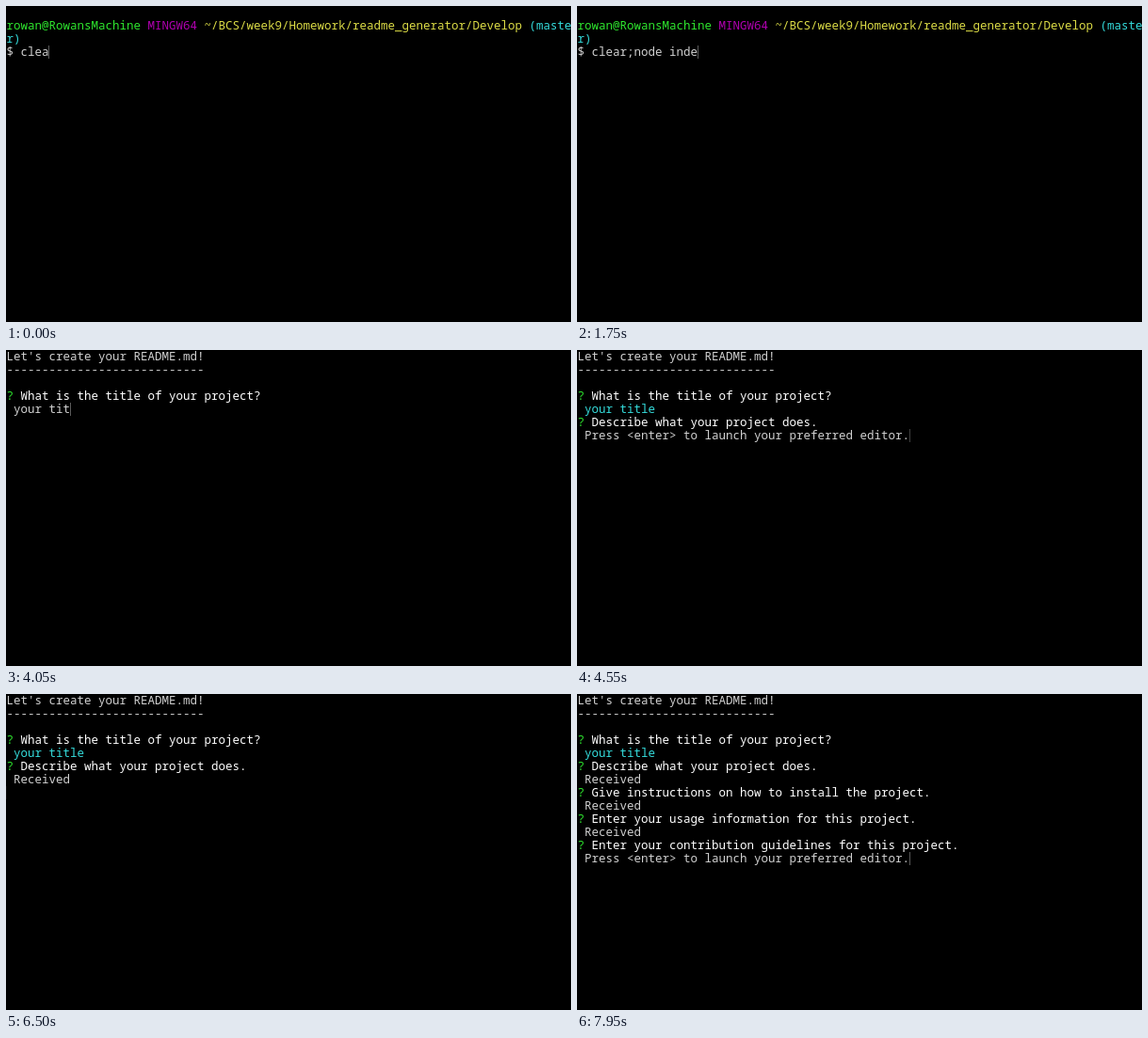
These frames come from a looping animation (600 by 336 pixels, 8000 ms). An HTML page with a canvas:

```html
<!DOCTYPE html>
<html>
<head>
<meta charset="utf-8">
<style>
html, body { margin: 0; width: 100%; height: 100%; overflow: hidden; background: #000; }
canvas { display: block; }
</style>
</head>
<body>
<canvas id="screen" width="600" height="336"></canvas>
<script>
const ctx = document.getElementById('screen').getContext('2d');
const LOOP = 8000, CELL = 7.5, LINE = 14, COLUMNS = 80;
const GREEN = '#2ee62e', MAGENTA = '#b000b0', YELLOW = '#dcdc46',
      CYAN = '#34dada', GRAY = '#d0d0d0', WHITE = '#ffffff';

const prompt = [
  [GREEN, 'rowan@RowansMachine '],
  [MAGENTA, 'MINGW64 '],
  [YELLOW, '~/BCS/week9/Homework/readme_generator/Develop '],
  [CYAN, '(master)']
];
const hint = 'Press <enter> to launch your preferred editor.';
const CLEAR = 2250, HEADER = 2450, ASK_TITLE = 2500, TITLE_DONE = 4350, REPLY = 100;

// A run of evenly spaced keystrokes.
const burst = (text, start, gap) =>
  [...text].map((char, i) => ({ char, time: start + i * gap }));

const command = [
  ...burst('clea', 250, 100), ...burst('r;', 800, 200),
  ...burst('node inde', 1150, 75), ...burst('x.js', 1900, 85)
];
const title = [...burst('your ', 3450, 60), ...burst('title', 3850, 85)];
const questions = [
  { text: 'Describe what your project does.', asked: 4400 },
  { text: 'Give instructions on how to install the project.', asked: 6600 },
  { text: 'Enter your usage information for this project.', asked: 7550 },
  { text: 'Enter your contribution guidelines for this project.', asked: 7900 }
];
const events = [0, HEADER, ASK_TITLE,
  ...[...command, ...title].map(key => key.time), ...questions.map(q => q.asked)];

const typed = (keys, t) => keys.filter(k => k.time <= t).map(k => k.char).join('');

// Writes coloured segments on the character grid, wrapping at the last column.
function write(row, ...segments) {
  let cell = 0;
  for (const [color, text] of segments) {
    ctx.fillStyle = color;
    for (const char of text) {
      ctx.fillText(char, cell % COLUMNS * CELL + .6,
                   (row + Math.floor(cell / COLUMNS)) * LINE + 11);
      cell++;
    }
  }
}

// The cursor pulses softly, starting bright again after each event.
function drawCursor(row, column, t) {
  const idle = t - Math.max(...events.filter(time => time <= t));
  const level = .22 * (1 + Math.cos(idle / 800 * 2 * Math.PI));
  ctx.fillStyle = `rgba(208,208,208,${level})`;
  ctx.fillRect(Math.round(column * CELL), row * LINE, 1, LINE);
}

function ask(row, text) {
  write(row, [GREEN, '? '], [WHITE, text]);
}

function drawShell(t) {
  // the old input is deleted two characters at a time
  const input = t < 100 ? 'clea'.slice(0, t < 50 ? 4 : 2) : typed(command, t);
  write(1, ...prompt);
  write(3, [GRAY, '$ ' + input]);
  drawCursor(3, 2 + input.length, t);
}

function drawGenerator(t) {
  let cursor = [0, 0];
  if (t >= HEADER) {
    write(0, [GRAY, "Let's create your README.md!"]);
    write(1, [GRAY, '-'.repeat(28)]);
    cursor = [3, 0];
  }
  if (t >= ASK_TITLE) {
    const answer = typed(title, t) || '(Title) ';
    ask(3, 'What is the title of your project?');
    write(4, [t < TITLE_DONE ? GRAY : CYAN, ' ' + answer]);
    cursor = t < TITLE_DONE ? [4, 1 + answer.length] : [5, 0];
  }
  questions.forEach(({ text, asked }, i) => {
    if (t < asked) return;
    const row = 5 + 2 * i, next = questions[i + 1];
    const done = next && t >= next.asked - REPLY;
    ask(row, text);
    write(row + 1, [GRAY, ' ' + (done ? 'Received' : hint)]);
    cursor = done ? [row + 2, 0] : [row + 1, 1 + hint.length];
  });
  drawCursor(...cursor, t);
}

function frame(now) {
  const t = now % LOOP;
  ctx.fillStyle = '#000';
  ctx.fillRect(0, 0, 600, 336);
  ctx.font = '500 12.5px "Noto Sans Mono", "DejaVu Sans Mono", monospace';
  (t < CLEAR ? drawShell : drawGenerator)(t);
  requestAnimationFrame(frame);
}
requestAnimationFrame(frame);
</script>
</body>
</html>
```
